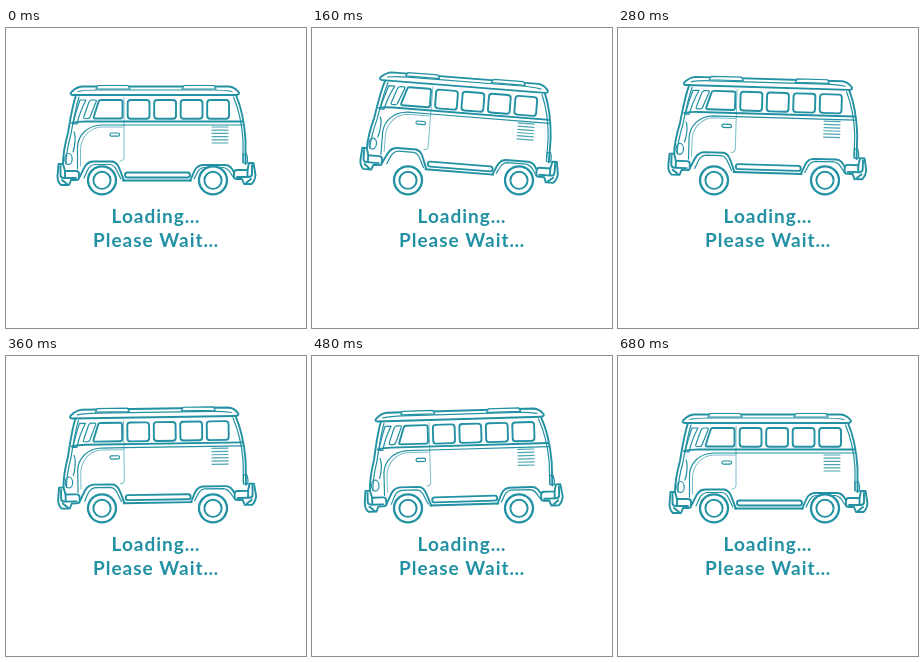
Recreate the animation shown at these times as an HTML page. Size 300 by 300 pixels, loop 720 ms.

```html
<!DOCTYPE html>
<html lang="en">
<head>
<meta charset="utf-8">
<title>Loading</title>
<style>
html, body { margin: 0; width: 100%; height: 100%; overflow: hidden; background: #fff; }
svg { display: block; width: 100vw; height: 100vh; }
text { font: 700 19px Lato, "Open Sans", sans-serif; letter-spacing: 1px; fill: #2191a3; }
.line { fill: none; stroke: #2191a3; stroke-width: 1.9; stroke-linejoin: round; stroke-linecap: round; }
.thin { stroke-width: 1.2; }
.faint { stroke-width: 1; stroke-opacity: .6; }
.white { fill: #fff; }
</style>
</head>
<body>
<svg viewBox="0 0 300 300">
  <g id="body" class="line">
    <!-- roof and rack -->
    <path d="M67 67C64 67 64 65 66 63.500C69 60.500 71 59 76 58.500H223C228 59 230 61 232 63.500C234 65 233 67 230 67Z"/>
    <path class="thin" d="M72 63.500Q80 62 92 62H206Q218 62 226 63.500"/>
    <path class="thin white" d="M92 57.500H122L124 61H90ZM178 57.500H208L210 61H176Z"/>
    <!-- shell -->
    <path d="M70 67C66 79 64 93 62 105C59 116 57 125 57 136M230 67C236 81 238.500 96 239.500 112V136"/>
    <path class="thin" d="M73 69C69 82 67 94 65 106C62 117 60 126 60 136M227.500 69C233 82 236 97 237 112V134"/>
    <path d="M66 95Q72 93.500 80 93.500H236.500"/>
    <path class="thin" d="M118 97H237"/>
    <path d="M117 152.500H185"/>
    <path d="M73 150C77 144 78 134 87 133.500H106C113 134 114 144 118 152.500M184 152.500C188 146 188 138 196 137H219C226 137 227 144 231 149"/>
    <path class="thin" d="M78 150C81 144 82 137 89 136.500H104C110 137 111 144 115 151M188 151C191 146 192 140 198 139.500H217C223 140 224 145 228 150"/>
    <rect x="119" y="144.500" width="65" height="5" rx="2.500"/>
    <!-- cab -->
    <path class="faint" d="M118 70V129Q118 133 114 133"/>
    <path class="thin" d="M118 97H95C80 98 72 108 71.500 119V141"/>
    <path class="faint" d="M117 99H95C83 100 75 110 74.500 121V138"/>
    <path d="M95 72H114.500Q116.500 72 116.500 74V88Q116.500 90.500 114.500 90.500H89Q87 90.500 88 88L92.500 74Q93 72 95 72Z"/>
    <path class="thin" d="M86 72H89Q91 72 90 74L84 89Q83.500 90.500 81.500 90.500H79Q77 90.500 78 88L83 74Q84 72 86 72Z"/>
    <path class="thin" d="M74 72H80Q74 83 71 96H67Q70 83 74 72Z"/>
    <rect class="thin" x="104" y="105" width="9.500" height="3.200" rx="1.500"/>
    <path class="thin" d="M68 104C70 108 69 119 67 124"/>
    <ellipse class="thin" cx="62.500" cy="131" rx="3.700" ry="5.500"/>
    <g id="windows"></g>
    <g id="vents" class="thin" stroke-opacity=".8"></g>
    <!-- bumpers -->
    <path class="white" d="M52.500 136H57L59 143H70Q73 143 73 146V150Q73 152 70 152H65L63 157H55Q51.500 154 51.500 148Z"/>
    <path d="M54.500 138V147Q54.500 150 58 150H70M56 152L61 156M59 143V149"/>
    <path class="white" d="M247.500 135H243L241.500 142H231Q228 142 228 145V149Q228 151 231 151H236L238 156H245.500Q249 153 249.500 147Z"/>
    <path d="M246 137V146Q246 149 242.500 149H231M245 151L240 155M241.500 142V148"/>
    <path class="thin" d="M237 126H240.500Q242 130 241.500 135H237Z"/>
  </g>
  <g id="wheels" class="line"></g>
  <text x="105.500" y="195">Loading…</text>
  <text x="87" y="219">Please Wait…</text>
</svg>
<script>
const $ = id => document.getElementById(id);
const LOOP = 720, STEP = 40;

$("windows").innerHTML = [121.7, 148.2, 174.7, 201.2]
  .map(x => `<rect x="${x}" y="72" width="21.8" height="18.8" rx="3"/>`).join("");
$("vents").innerHTML = Array.from({ length: 6 }, (_, i) =>
  `<path d="M206 ${99 + i * 3.2}H222"/>`).join("");
$("wheels").innerHTML = [96, 207].map(x =>
  `<circle class="white" cx="${x}" cy="152.3" r="14" stroke-width="2.3"/>
   <circle cx="${x}" cy="152.3" r="8.6"/>`).join("");

// time, tilt in degrees, lift in pixels
const keys = [
  [0, 0, 0], [80, 2.2, 3.3], [160, 4.5, 8.5], [280, 1.7, 7.5],
  [400, -1.7, 5], [560, -1, 2.8], [680, 0, 0], [720, 0, 0]
];

function slope(i, c) {
  if (i === 0 || i >= keys.length - 2) return 0;
  const a = keys[i - 1], b = keys[i + 1];
  return (b[c] - a[c]) / (b[0] - a[0]);
}

// smooth Hermite curve through the keys
function sample(t, c) {
  let i = 0;
  while (i < keys.length - 2 && t >= keys[i + 1][0]) i++;
  const a = keys[i], b = keys[i + 1], d = b[0] - a[0];
  const u = (t - a[0]) / d, v = 1 - u;
  return v * v * ((1 + 2 * u) * a[c] + u * d * slope(i, c))
       + u * u * ((1 + 2 * v) * b[c] - v * d * slope(i + 1, c));
}

function draw(now) {
  const t = Math.floor((now % LOOP) / STEP) * STEP;
  const tilt = sample(t, 1), lift = sample(t, 2);
  $("body").setAttribute("transform", `translate(0 ${-lift}) rotate(${tilt} 150 105)`);
}

let start;
function tick(now) {
  start ??= now;
  draw(now - start);
  requestAnimationFrame(tick);
}
draw(0);
requestAnimationFrame(tick);
</script>
</body>
</html>
```
